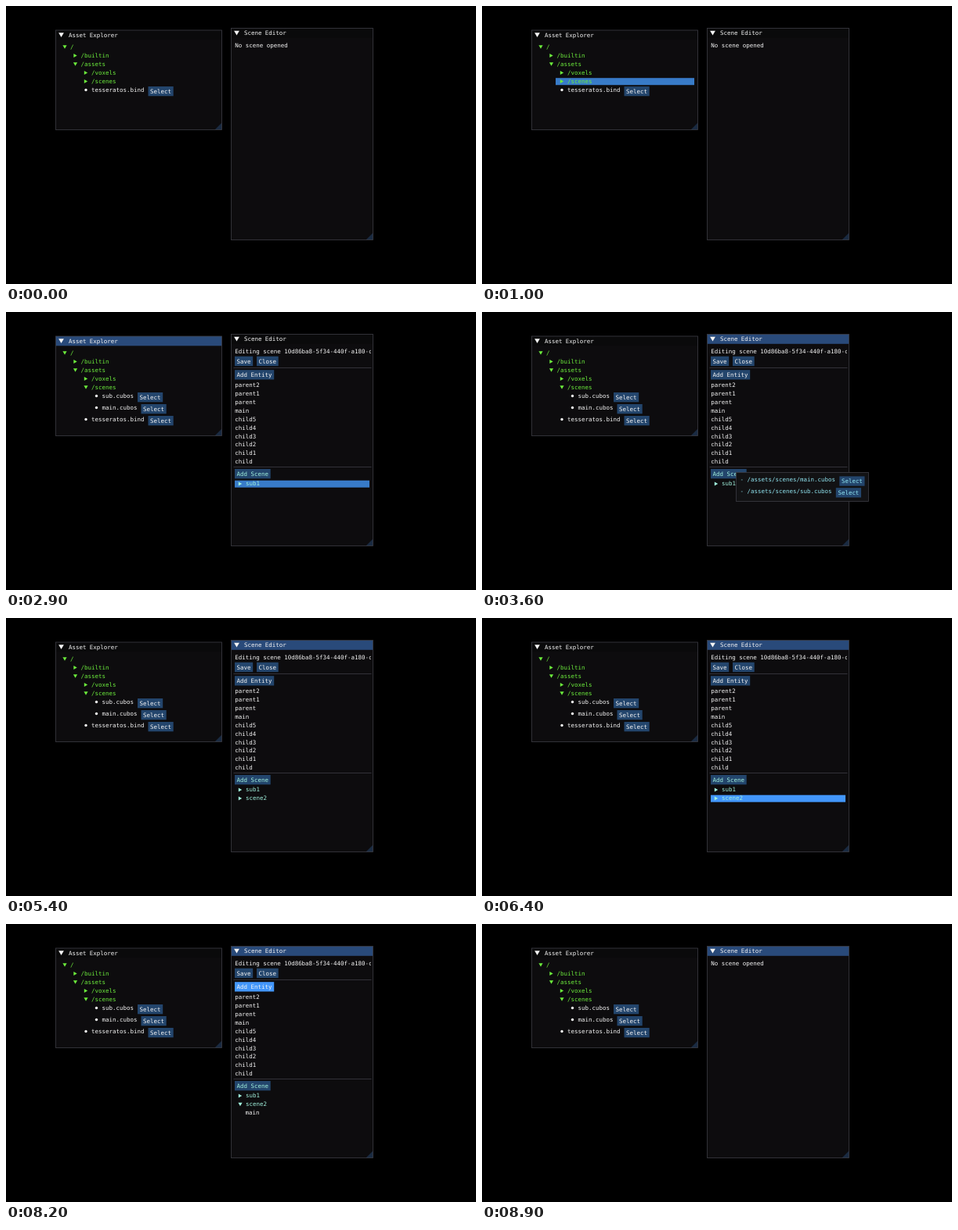
An HTML page for the animation above (9800 ms loop, 600x356 px).

```html
<!DOCTYPE html>
<html lang="en">
<head>
<meta charset="utf-8">
<title>Scene editor</title>
<style>
html, body { margin: 0; width: 100%; height: 100%; overflow: hidden; background: #000; }
svg { display: block; width: 600px; height: 356px; }
text { font: 7.475px "DejaVu Sans Mono", "Liberation Mono", monospace; text-rendering: geometricPrecision; white-space: pre; }
</style>
</head>
<body>
<svg id="stage" viewBox="0 0 600 356" xmlns="http://www.w3.org/2000/svg"></svg>
<script>
const LOOP = 9800;
const stage = document.getElementById("stage");

const WHITE = "#f4f4f4", GREEN = "#6cec3c", MINT = "#a0f0dc", CYAN = "#90e4f0";
const BUTTON = { idle: "#23456c", hover: "#4296fa", press: "#0f87fa" };
const ROW = { hover: "#387bc8", press: "#4296fa" };
const ENTITIES = ["parent2", "parent1", "parent", "main", "child5", "child4", "child3", "child2", "child1", "child"];

// Pointer targets: [start, end, widget, mode]
const POINTER = [
  [1000, 1300, "scenes", "hover"],
  [1300, 1400, "scenes", "press"],
  [1400, 1600, "scenes", "hover"],
  [2000, 2300, "openMain", "hover"],
  [2300, 2400, "openMain", "press"],
  [2400, 2600, "openMain", "hover"],
  [2900, 3200, "sub1", "hover"],
  [3200, 3500, "addScene", "hover"],
  [3500, 3600, "addScene", "press"],
  [4200, 5000, "pickSub", "hover"],
  [5000, 5100, "pickSub", "press"],
  [6100, 6400, "scene2", "hover"],
  [6400, 6600, "scene2", "press"],
  [6600, 7800, "scene2", "hover"],
  [7900, 8000, "addScene", "hover"],
  [8200, 8400, "addEntity", "hover"],
  [8400, 8700, "close", "hover"],
  [8700, 8800, "close", "press"]
];

const rect = (x, y, w, h, fill, extra = "") =>
  `<rect x="${x}" y="${y}" width="${w}" height="${h}" fill="${fill}" ${extra}/>`;

const label = (x, mid, str, fill = WHITE, extra = "") =>
  `<text x="${x}" y="${mid + 2.4}" fill="${fill}" ${extra}>${str}</text>`;

const poly = (points, fill) => `<polygon points="${points}" fill="${fill}"/>`;

function arrow(x, y, open, fill, r = 2.6) {
  const k = r * 0.85;
  return open
    ? poly(`${x - r},${y - k} ${x + r},${y - k} ${x},${y + k}`, fill)
    : poly(`${x - k},${y - r} ${x + k},${y} ${x - k},${y + r}`, fill);
}

function panel(x, y, w, h, title, focused) {
  const r = x + w, b = y + h;
  return rect(x, y, w, h, "#0d0c0e") +
    rect(x, y, w, 12.3, focused ? "#294a7a" : "#0a0a0b") +
    poly(`${r},${b} ${r - 9},${b} ${r},${b - 9}`, "#1a2b42") +
    rect(x, y, w, h, "none", 'stroke="#3c3c44" stroke-width="0.8"') +
    arrow(x + 7, y + 6.1, true, WHITE, 3.4) +
    label(x + 16.4, y + 6.3, title);
}

function button(x, y, str, mode = "idle", fill = WHITE) {
  return rect(x, y, str.length * 4.5 + 5.2, 12.3, BUTTON[mode]) +
    label(x + 2.6, y + 6.3, str, fill);
}

function node(x, y, str, open, fill, mode, left, right) {
  return (mode ? rect(left, y - 4.3, right - left, 9, ROW[mode]) : "") +
    arrow(x, y, open, fill) + label(x + 7, y, str, fill);
}

function asset(x, y, str, mode) {
  return `<circle cx="${x}" cy="${y}" r="1.7" fill="${WHITE}"/>` +
    label(x + 7, y, str) +
    button(x + 12 + str.length * 4.5, y - 4.5, "Select", mode);
}

const line = y => rect(290.5, y, 176, 0.8, "#3c3c44");

function explorer(t, mode) {
  const open = t >= 1400;
  let out = panel(63.5, 31, 212, 127.5, "Asset Explorer", t >= 1300 && t < 3500) +
    node(75, 52.5, "/", true, GREEN) +
    node(88.5, 63.5, "/builtin", false, GREEN) +
    node(88.5, 74.5, "/assets", true, GREEN) +
    node(102, 85.5, "/voxels", false, GREEN) +
    node(102, 96.5, "/scenes", open, GREEN, mode("scenes"), 94, 271);
  if (open) {
    out += asset(115.5, 107.5, "sub.cubos", mode("openSub")) +
      asset(115.5, 122.5, "main.cubos", mode("openMain"));
  }
  return out + asset(102, open ? 137.5 : 107.5, "tesseratos.bind", mode("openBind"));
}

function editor(t, mode) {
  let out = panel(287.5, 28.5, 181, 271, "Scene Editor", t >= 3500);
  if (t < 2400 || t >= 8800) return out + label(292.2, 50.3, "No scene opened");

  out += label(292.2, 50.3, "Editing scene 10d86ba8-5f34-440f-a180-c", WHITE, 'clip-path="url(#body)"') +
    button(292, 56.8, "Save", mode("save")) +
    button(320, 56.8, "Close", mode("close")) +
    line(71.2) +
    button(292, 74.2, "Add Entity", mode("addEntity"));
  ENTITIES.forEach((name, i) => out += label(292.2, 93.4 + i * 10.95, name));
  out += line(198) +
    button(292, 201, "Add Scene", mode("addScene"), MINT) +
    node(299, 220, "sub1", false, MINT, mode("sub1"), 292, 464);
  if (t >= 5100) {
    const open = t >= 6600;
    out += node(299, 231, "scene2", open, MINT, mode("scene2"), 292, 464);
    if (open) out += label(305.6, 242, "main");
  }
  return out;
}

function picker(mode) {
  return rect(324.5, 205.5, 169, 37, "#121214", 'stroke="#3c3c44" stroke-width="0.8"') +
    label(329.5, 215, "- /assets/scenes/main.cubos", CYAN) +
    button(456.3, 210.4, "Select", mode("pickMain"), CYAN) +
    label(329.5, 230, "- /assets/scenes/sub.cubos", CYAN) +
    button(451.8, 225.2, "Select", mode("pickSub"), CYAN);
}

function draw(t) {
  const hit = POINTER.find(([from, to]) => t >= from && t < to);
  const mode = id => hit && hit[2] === id ? hit[3] : undefined;
  stage.innerHTML =
    '<defs><clipPath id="body"><rect x="288" y="41" width="178" height="258"/></clipPath></defs>' +
    rect(0, 0, 600, 356, "#000") +
    explorer(t, mode) + editor(t, mode) +
    (t >= 3600 && t < 5100 ? picker(mode) : "");
}

// All changes fall on tenths of a second, so redraw only then.
const start = performance.now();
let last = -1;
function tick() {
  const step = Math.floor(Math.max(0, performance.now() - start) % LOOP / 100);
  if (step !== last) draw((last = step) * 100);
  requestAnimationFrame(tick);
}
tick();
</script>
</body>
</html>
```
